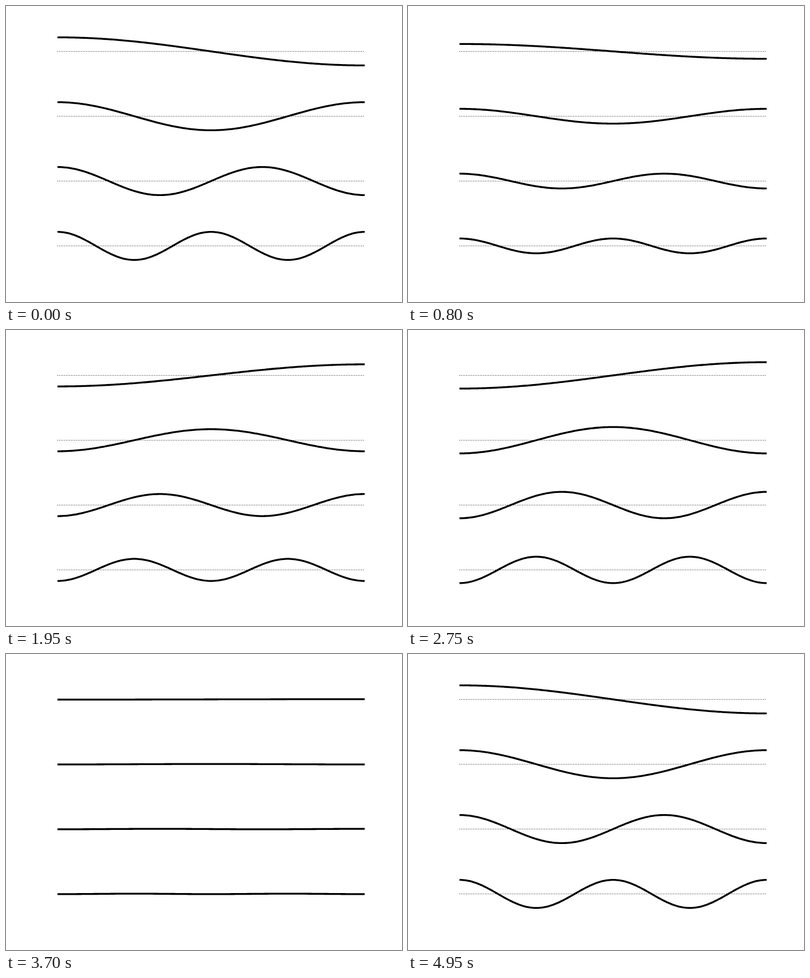
These frames come from a looping animation (700x525 px, 5 s). An HTML page with a canvas:

```html
<!DOCTYPE html>
<html lang="en">
<head>
<meta charset="utf-8">
<title>Standing waves</title>
<style>
  html, body { margin: 0; width: 100%; height: 100%; overflow: hidden; background: #fff; }
  canvas { display: block; }
</style>
</head>
<body>
<canvas id="stage" width="700" height="525"></canvas>
<script>
const ctx = document.getElementById('stage').getContext('2d');
const LEFT = 91, RIGHT = 634, WIDTH = RIGHT - LEFT;
const FIRST_Y = 80.5, SPACING = 115, MODES = 4;
const AMPLITUDE = 24.9, STEP = 50, STEPS = 100;

function drawAxis(y) {
  for (let x = LEFT; x < RIGHT; x += 3) ctx.fillRect(x, y - 0.5, 1, 1);
}

function drawMode(mode, y, amplitude) {
  const points = 200;
  ctx.beginPath();
  for (let i = 0; i <= points; i++) {
    const u = i / points;
    ctx.lineTo(LEFT + u * WIDTH, y - amplitude * Math.cos(mode * Math.PI * u));
  }
  ctx.stroke();
}

function draw(time) {
  // First and last steps share the same pose.
  const step = Math.floor(time / STEP) % STEPS;
  const amplitude = AMPLITUDE * Math.cos(2 * Math.PI * step / (STEPS - 1));
  ctx.fillStyle = '#fff';
  ctx.fillRect(0, 0, 700, 525);
  ctx.fillStyle = ctx.strokeStyle = '#000';
  ctx.lineWidth = 3.3;
  ctx.lineJoin = 'round';
  for (let mode = 1; mode <= MODES; mode++) {
    const y = FIRST_Y + (mode - 1) * SPACING;
    drawAxis(y);
    drawMode(mode, y, amplitude);
  }
}

const start = performance.now();
function tick() {
  draw(performance.now() - start);
  requestAnimationFrame(tick);
}
tick();
</script>
</body>
</html>
```
